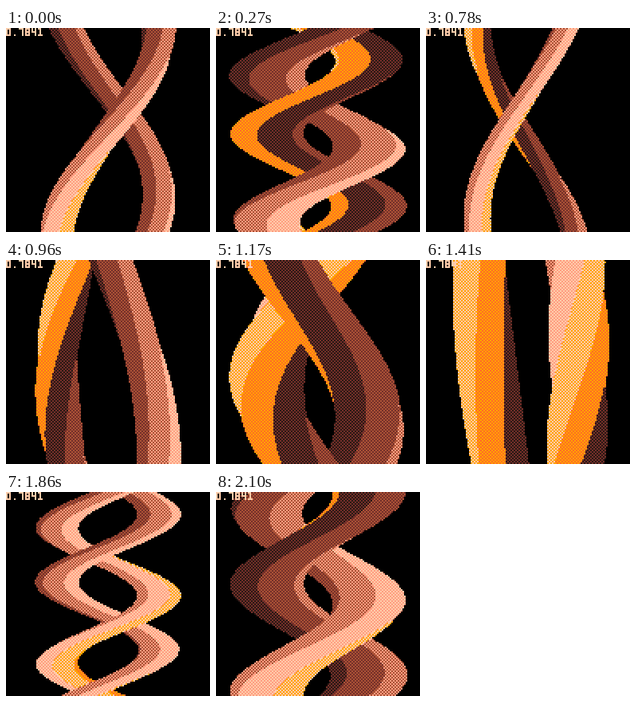
These frames come from a looping animation (256 px wide and 256 px high, 2.13 s). An HTML page with a canvas:

```html
<!DOCTYPE html>
<html lang="en">
<head>
<meta charset="utf-8">
<title>Twisting strands</title>
<style>
  html, body { margin: 0; width: 100%; height: 100%; overflow: hidden; background: #000; }
  canvas { display: block; width: 256px; height: 256px; image-rendering: pixelated; }
</style>
</head>
<body>
<canvas id="stage" width="128" height="128" role="img" aria-label="0.7841"></canvas>
<script>
const SIZE = 128, STEP = 30, LOOP = 2130, TURN = Math.PI * 2;
const ctx = document.getElementById('stage').getContext('2d');
const cos = a => Math.cos(a * TURN);
const sin = a => Math.sin(a * TURN);

// Each side of a strand is a checkerboard of two colours.
const SIDES = [
  ['#ffa300', '#ff6c24'],
  ['#291814', '#742f29'],
  ['#742f29', '#ab5236'],
  ['#ab5236', '#ff9d81'],
  ['#ff9d81', '#ffccaa'],
  ['#ffccaa', '#ffa300']
].map(checker);

// 3x5 glyphs, one octal digit per row.
const GLYPHS = { 0: '75557', '.': '00002', 7: '71111', 8: '75757', 4: '55711', 1: '62227' };

// Strands differ in orbit offset and in how they roll over time and height.
const STRANDS = [
  { lag: 0, roll: 0.707, speed: -0.72, twist: 0.355 },
  { lag: 0.4, roll: 0.655, speed: -1.5, twist: 0.14 }
];

function checker([a, b]) {
  const tile = document.createElement('canvas');
  tile.width = tile.height = 2;
  const c = tile.getContext('2d');
  c.fillStyle = a;
  c.fillRect(0, 0, 2, 2);
  c.fillStyle = b;
  c.fillRect(1, 0, 1, 1);
  c.fillRect(0, 1, 1, 1);
  return ctx.createPattern(tile, 'repeat');
}

// One row of a hexagonal rod: only sides facing the viewer are drawn.
function drawRow(y, centre, radius, roll) {
  SIDES.forEach((fill, i) => {
    const left = Math.floor(centre + radius * cos(roll - i / 6));
    const right = Math.floor(centre + radius * cos(roll - (i + 1) / 6));
    if (right <= left) return;
    ctx.fillStyle = fill;
    ctx.fillRect(left, y, right - left + 1, 1);
  });
}

function drawText(text) {
  ctx.fillStyle = '#ffccaa';
  [...text].forEach((ch, i) => {
    [...GLYPHS[ch]].forEach((bits, y) => {
      for (let x = 0; x < 3; x++) {
        if (bits & (4 >> x)) ctx.fillRect(i * 4 + x, y, 1, 1);
      }
    });
  });
}

function draw(ms) {
  const t = ms / 1500;
  const coil = 0.51 + sin(t - 0.004);
  const radius = 16 - 8 * cos((ms - 782) / 900);
  ctx.fillStyle = '#000';
  ctx.fillRect(0, 0, SIZE, SIZE);
  for (let y = 0; y < SIZE; y++) {
    const h = y / SIZE;
    STRANDS
      .map(s => ({ angle: t + coil * h - s.lag, roll: s.roll + s.speed * t + s.twist * h }))
      .sort((a, b) => sin(a.angle) - sin(b.angle))
      .forEach(p => drawRow(y, 64 + 32 * cos(p.angle), radius, p.roll));
  }
  drawText('0.7841');
}

const start = performance.now();
function tick() {
  const ms = (performance.now() - start) % LOOP;
  draw(Math.floor(ms / STEP) * STEP);
  requestAnimationFrame(tick);
}
tick();
</script>
</body>
</html>
```
